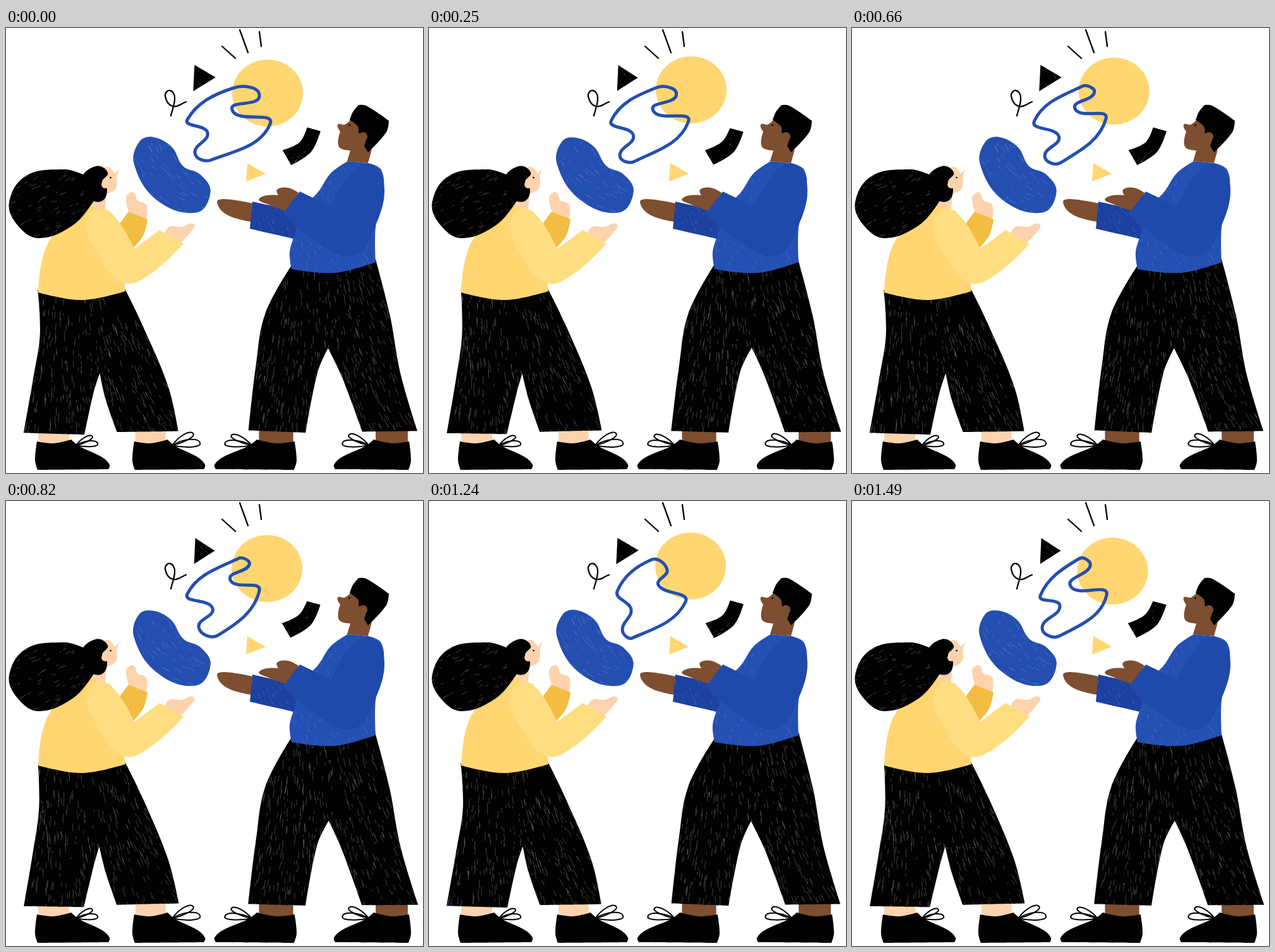
Recreate the animation shown at these times as an HTML page. Size 660 px wide and 705 px high, loop 1660 ms.

```html
<!DOCTYPE html>
<html lang="en">
<head>
<meta charset="utf-8">
<title>Sharing ideas</title>
<style>
  html, body { margin: 0; width: 100%; height: 100%; overflow: hidden; background: #fff; }
  svg { display: block; width: 100%; height: 100%; }
</style>
</head>
<body>
<svg id="stage" viewBox="0 0 660 705"></svg>
<script>
const NS = 'http://www.w3.org/2000/svg';
const stage = document.getElementById('stage');
const BLACK = '#020202', YELLOW = '#ffd671', BLUE = '#1f49aa', SKIN = '#fdd3ae', BROWN = '#7d4e2f';

function random(seed) {
  return () => {
    seed = (seed + 0x6d2b79f5) | 0;
    let t = Math.imul(seed ^ (seed >>> 15), 1 | seed);
    t = (t + Math.imul(t ^ (t >>> 7), 61 | t)) ^ t;
    return ((t ^ (t >>> 14)) >>> 0) / 4294967296;
  };
}
const rnd = random(7);
const spread = size => (rnd() - 0.5) * 2 * size;

function add(parent, tag, attrs = {}) {
  const el = document.createElementNS(NS, tag);
  for (const key in attrs) el.setAttribute(key, attrs[key]);
  parent.appendChild(el);
  return el;
}
const layer = (parent = stage) => add(parent, 'g');

// "x,y" is a smooth point, "x,y!" a corner
const parse = text => text.split(' ').map(part => {
  const [x, y] = part.replace('!', '').split(',').map(Number);
  return { x, y, corner: part.endsWith('!') };
});
const wobble = (points, size) => points.map(p => ({ ...p, x: p.x + spread(size), y: p.y + spread(size) }));
const between = (a, b) => a.map((p, i) => ({ x: (p.x + b[i].x) / 2, y: (p.y + b[i].y) / 2 }));

// curve through the points; each handle follows its neighbours' chord
function smooth(p, open) {
  const n = p.length;
  const at = i => open ? p[Math.max(0, Math.min(n - 1, i))] : p[(i + n) % n];
  const handle = (i, side) => {
    const a = at(i - 1), b = at(i), c = at(i + 1), to = at(i + side);
    if (b.corner) return `${b.x},${b.y}`;
    const k = side * 0.36 * Math.hypot(to.x - b.x, to.y - b.y) / Math.hypot(c.x - a.x, c.y - a.y);
    return `${b.x + (c.x - a.x) * k},${b.y + (c.y - a.y) * k}`;
  };
  let d = `M${p[0].x},${p[0].y}`;
  for (let i = 0; i < (open ? n - 1 : n); i++) {
    d += `C${handle(i, 1)} ${handle(i + 1, -1)} ${at(i + 1).x},${at(i + 1).y}`;
  }
  return d + (open ? '' : 'Z');
}

const fill = (parent, d, color) => add(parent, 'path', { d, fill: color });
const shape = (parent, text, color) => fill(parent, smooth(parse(text)), color);
const dot = (parent, cx, cy, r, color) => add(parent, 'circle', { cx, cy, r, fill: color });
const stroke = (parent, d, width, color = BLACK) => add(parent, 'path', {
  d, fill: 'none', stroke: color, 'stroke-width': width, 'stroke-linecap': 'round', 'stroke-linejoin': 'round'
});

// a filled shape with dry-brush flecks inside it
let clips = 0;
function brushed(parent, points, color, { lean = () => 0.5, size = 7, ink = '#fff', alpha = 0.35, density = 0.006 } = {}) {
  const d = smooth(points), box = fill(parent, d, color).getBBox(), id = 'clip' + clips++;
  fill(add(parent, 'clipPath', { id }), d, BLACK);
  let marks = '';
  for (let n = box.width * box.height * density; n > 0; n--) {
    const x = box.x + rnd() * box.width, y = box.y + rnd() * box.height;
    const len = size * (0.25 + rnd()), angle = lean(x, y) + spread(0.08);
    marks += `M${x},${y}l${Math.sin(angle) * len},${Math.cos(angle) * len}`;
  }
  const flecks = stroke(parent, marks, 0.75, ink);
  flecks.setAttribute('opacity', alpha);
  flecks.setAttribute('clip-path', `url(#${id})`);
}

// ---------- feet ----------
function shoe(heel, dir, width, lace, skin) {
  const g = layer();
  g.setAttribute('transform', `translate(${heel}) scale(${dir * width / 120} 1)`);
  add(g, 'rect', { x: 5, y: 630, width: 50, height: 30, fill: skin });
  shape(g, '3,655! 30,658 58,652! 72,663 108,680 120,692 118,699! 4,700! 0,685', BLACK);
  for (const [angle, len] of [[-27, lace * 0.85], [-3, lace]]) {
    const leaf = `M0,0C${len * 0.4},${-len * 0.2} ${len},${-len * 0.24} ${len},0C${len},${len * 0.14} ${len * 0.4},${len * 0.12} 0,0`;
    stroke(g, leaf, 2).setAttribute('transform', `translate(66 661) rotate(${angle})`);
  }
}
shoe(46, 1, 118, 35, SKIN);
shoe(200, 1, 115, 46, SKIN);
shoe(460, -1, 130, 39, BROWN);
shoe(641, -1, 122, 41, BROWN);

// ---------- sun, then the parts that boil between three drawings ----------
const sun = add(stage, 'ellipse', { cx: 414, cy: 103, rx: 56, ry: 53, fill: YELLOW });

const legs = middle => ({ lean: x => (x - middle) / 300, size: 11, alpha: 0.33, density: 0.008 });
const boiling = [
  ['51,416! 53,485 43,555 28,642! 124,644! 139,578 148,547! 158,588 176,640! 273,638! 257,567 215,468 189,414!', BLACK, legs(85)],
  ['452,376! 411,452 396,535 384,638! 474,641! 493,545 510,507! 531,552 564,640! 652,639! 625,547 607,455 585,367!', BLACK, legs(470)],
  ['232,173 262,188 280,219 308,232 323,260 301,292 238,271 203,215 210,180', '#244fb0',
    { lean: (x, y) => (y - 130) / 130, size: 10, ink: '#a9bdf0' }],
  ['299,58! 331,78! 297,100!', BLACK, { size: 4 }],
  ['476,158! 498,164! 483,196 451,217! 437,194! 464,181', BLACK, { lean: () => -0.6, size: 5 }]
];
const looks = [0, 1, 2].map(() => {
  const g = layer();
  for (const [text, color, brush] of boiling) brushed(g, wobble(parse(text), 0.8), color, brush);
  return g;
});

// ---------- small ornaments ----------
const bits = layer();
shape(bits, '382,214! 411,231! 380,243!', YELLOW);
stroke(bits, smooth(parse('261,139 267,110 259,99 252,108 264,124 285,117'), true), 2.3);
stroke(bits, 'M342,29L363,48M370,3L383,39M401,6L404,29', 2.3);

// ---------- woman ----------
const her = layer();
shape(her, '198,260 190,269 195,293! 222,303! 222,280 208,273 204,263', SKIN);
brushed(her, parse('194,291! 224,303! 217,329 198,352! 176,315!'), '#f3bd42', { lean: () => -0.4, size: 5, ink: '#ffe3a0' });
shape(her, '250,329! 258,315 278,315 297,311 290,326 277,340!', SKIN);
shape(her, '138,278! 75,328 57,368 51,419! 120,431 189,417! 187,402! 200,352! 166,292 155,287', YELLOW);
shape(her, '128,312 146,286 174,301 203,350! 243,320! 281,342! 231,388 187,404 144,356', '#ffde82');
shape(her, '134,266! 150,225! 162,220 172,231! 179,224! 175,236! 174,254 159,263! 157,287! 137,281', SKIN);
brushed(her, parse('5,276 32,234 92,224 122,232! 140,272! 108,311 52,333 18,312'), BLACK, { lean: () => -1.05 });
shape(her, '119,240 142,219 161,229 152,244 160,256 152,274 132,270', BLACK);
dot(her, 157, 248, 6, SKIN);
dot(her, 165.5, 237, 1.3, BLACK);

// ---------- man ----------
const him = layer();
const wool = { size: 7, ink: '#7f9be4', density: 0.008 };
shape(him, '334,276 346,271 391,278! 388,307! 350,296', BROWN);
brushed(him, parse('390,275! 440,286! 470,300! 460,335! 386,318!'), '#1c41a0', wool);
brushed(him, parse('541,211! 573,214! 594,225 597,262 585,315 585,371! 520,388 452,382! 449,355 458,325! 470,282! 493,261 514,230'), '#2450b4', wool);
shape(him, '401,270 431,265! 429,256 446,253 463,261! 446,291! 416,280', BROWN);
shape(him, '465,259! 515,283! 537,242 572,215 598,245 586,310 548,361 483,333 438,294!', BLUE);
shape(him, '545,146! 536,153 525,153 529,164! 527,188 545,194! 540,211! 573,214! 578,196! 585,150!', BROWN);
shape(him, '558,122! 570,123 606,147! 602,165 573,197! 567,187! 572,172! 558,166! 557,156 544,146! 549,133', BLACK);
dot(him, 565, 172, 7, BROWN);
dot(him, 543.5, 154, 1.4, BLACK);

// ---------- motion ----------
// the loop's eight key points: top, tip, hook, right, bottom, heel, notch, left
const wide = parse('360,95 401,108 358,130 418,152 325,209 299,198 319,166 287,145');
const slim = parse('360,94 382,104 351,131 403,145 325,214 305,206 328,174 290,148');
const tooth = parse('368,91 385,101 355,125 401,142 335,213 305,200 327,170 287,147');
const low = parse('362,97 387,107 369,125 418,149 325,205 297,189 327,159 289,144');
const tall = parse('352,93 377,109 363,133 406,160 322,217 306,204 320,172 298,143');
const hook = parse('360,91 377,103 346,135 403,149 328,214 301,201 329,166 298,150');

const steps = [
  { hold: 250, drop: 0, pose: wide },
  { hold: 160, drop: -5, pose: between(wide, slim) },
  { hold: 250, drop: -6, pose: slim },
  { hold: 160, drop: -3, pose: between(slim, tooth) },
  { hold: 250, drop: 4, pose: tooth },
  { hold: 170, drop: 10, pose: low },
  { hold: 250, drop: 0, pose: tall },
  { hold: 170, drop: 8, pose: hook }
];
let total = 0;
for (const step of steps) step.until = total += step.hold;

const loop = stroke(layer(), '', 5, '#244fb0');
let shown = -1;
function show(i) {
  if (i === shown) return;
  shown = i;
  const { drop, pose } = steps[i];
  sun.setAttribute('transform', `translate(${-drop / 5} ${drop})`);
  loop.setAttribute('d', smooth(pose));
  looks.forEach((g, k) => g.setAttribute('display', k === i % 3 ? 'inline' : 'none'));
}

const start = performance.now();
function tick() {
  const t = Math.max(0, performance.now() - start) % total;
  show(steps.findIndex(step => t < step.until));
  requestAnimationFrame(tick);
}
show(0);
requestAnimationFrame(tick);
</script>
</body>
</html>
```
